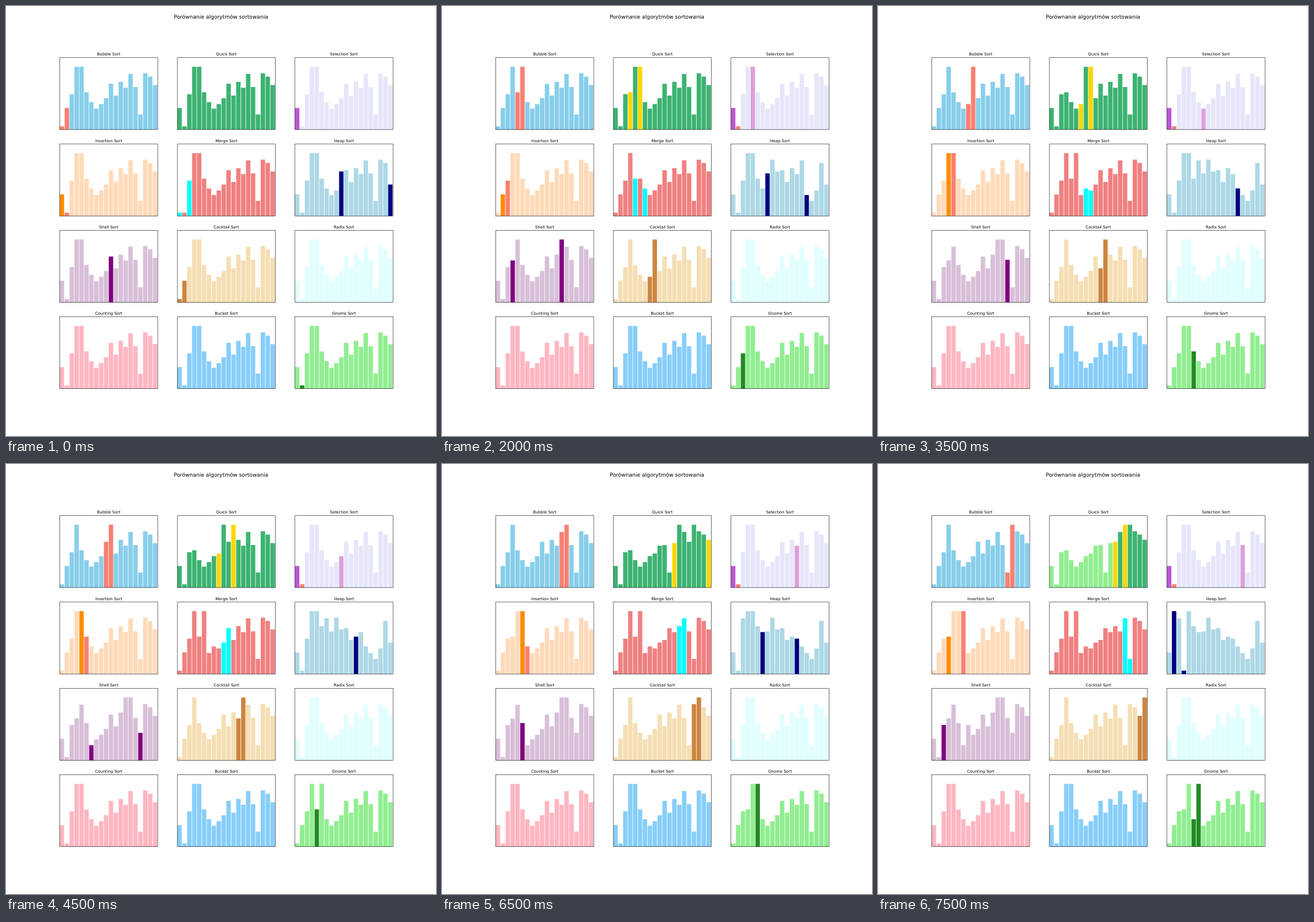
These frames come from a looping animation (748 by 748 pixels, 8 s). An HTML page:

```html
<!DOCTYPE html>
<html lang="pl">
<head>
<meta charset="utf-8">
<title>Porównanie algorytmów sortowania</title>
<style>
  html, body { margin: 0; width: 100%; height: 100%; overflow: hidden; background: #fff; }
  svg { display: block; width: 748px; height: 748px; }
  text {
    font-family: "DejaVu Sans", Verdana, sans-serif;
    font-size: 6.93px;
    text-anchor: middle;
    text-rendering: geometricPrecision;
  }
  text.head { font-size: 9.23px; }
  .axes { fill: none; stroke: #000; stroke-width: 0.6; }
</style>
</head>
<body>
<svg id="stage" viewBox="0 0 748 748">
  <text class="head" x="374" y="22.4">Porównanie algorytmów sortowania</text>
</svg>
<script>
const DATA = [33, 5, 54, 96, 96, 57, 42, 32, 39, 48, 70, 52, 73, 64, 85, 65, 23, 86, 81, 68];
const N = DATA.length;
const STEPS = 16, STEP_MS = 500;

// Grid geometry
const LEFT = 93.5, TOP = 89.76, W = 170.5, H = 125.2;
const PITCH_X = W * 1.2, PITCH_Y = H * 1.2;
const SLOT = W / N, BAR = SLOT * 0.9, UNIT = H / 110;

const swap = (a, i, j) => { [a[i], a[j]] = [a[j], a[i]]; };
const paint = (color, ...list) => list.map(i => [i, color]);

// Each sorter changes the array in place and yields [index, colour] marks;
// later marks cover earlier ones.
function* bubble(a) {
  for (let end = N - 1; end > 0; end--) {
    for (let j = 0; j < end; j++) {
      if (a[j] > a[j + 1]) swap(a, j, j + 1);
      yield paint('salmon', j, j + 1);
    }
  }
}

function* quick(a) {
  const stack = [[0, N - 1]];
  while (stack.length) {
    const [lo, hi] = stack.pop();
    if (lo >= hi) continue;
    const range = [];
    for (let i = 0; i < N; i++) {
      range.push([i, i >= lo && i <= hi ? 'mediumseagreen' : 'lightgreen']);
    }
    yield range;
    let i = lo - 1;
    for (let j = lo; j < hi; j++) {
      if (a[j] >= a[hi]) continue;
      swap(a, ++i, j);
      yield [...range, ...paint('gold', i, j)];
    }
    swap(a, ++i, hi);
    yield [...range, ...paint('gold', i, hi)];
    stack.push([lo, i - 1], [i + 1, hi]);
  }
}

function* selection(a) {
  for (let i = 0; i < N; i++) {
    let min = i;
    yield paint('mediumorchid', i);
    for (let j = i + 1; j < N; j++) {
      if (a[j] < a[min]) min = j;
      yield [[min, 'salmon'], [j, 'plum'], [i, 'mediumorchid']];
    }
    swap(a, i, min);
  }
}

function* insertion(a) {
  for (let i = 1; i < N; i++) {
    const key = a[i];
    let j = i - 1;
    const marks = () => [[j, 'darkorange'], [i, 'salmon']];
    yield marks();
    while (j >= 0 && a[j] > key) {
      a[j + 1] = a[j];
      j--;
      yield marks();
    }
    a[j + 1] = key;
    yield marks();
  }
}

function* merge(a) {
  for (let size = 1; size < N; size *= 2) {
    for (let lo = 0; lo < N; lo += 2 * size) {
      const mid = Math.min(lo + size, N), hi = Math.min(lo + 2 * size, N);
      const old = a.slice();
      let i = lo, j = mid;
      for (let k = lo; k < hi; k++) {
        const fromLeft = j >= hi || (i < mid && old[i] <= old[j]);
        a[k] = fromLeft ? old[i++] : old[j++];
        yield paint('cyan', i, j);
      }
    }
  }
}

function* sift(a, n, i) {
  let top = i;
  for (const child of [2 * i + 1, 2 * i + 2]) {
    if (child < n && a[child] > a[top]) top = child;
  }
  swap(a, i, top);
  yield paint('navy', i, top);
  if (top !== i) yield* sift(a, n, top);
}

function* heap(a) {
  for (let i = N / 2 - 1; i >= 0; i--) yield* sift(a, N, i);
  for (let end = N - 1; end > 0; end--) {
    swap(a, 0, end);
    yield* sift(a, end, 0);
  }
}

function* shell(a) {
  for (let gap = N >> 1; gap > 0; gap >>= 1) {
    for (let i = gap; i < N; i++) {
      const key = a[i];
      let j = i;
      while (j >= gap && a[j - gap] > key) {
        a[j] = a[j - gap];
        j -= gap;
        yield paint('purple', j, j - gap);
      }
      a[j] = key;
      yield paint('purple', j, i);
    }
  }
}

function* cocktail(a) {
  for (let lo = 0, hi = N - 1; lo < hi; lo++, hi--) {
    for (let j = lo; j < hi; j++) {
      if (a[j] <= a[j + 1]) continue;
      swap(a, j, j + 1);
      yield paint('peru', j, j + 1);
    }
    for (let j = hi - 1; j > lo; j--) {
      if (a[j - 1] <= a[j]) continue;
      swap(a, j - 1, j);
      yield paint('peru', j - 1, j);
    }
  }
}

function* gnome(a) {
  let i = 0;
  while (i < N) {
    if (i === 0 || a[i] >= a[i - 1]) {
      i++;
    } else {
      swap(a, i, i - 1);
      yield paint('forestgreen', i, i - 1);
      i--;
    }
    yield paint('forestgreen', i);
  }
}

// Still untouched during this stretch
function* idle() {
  while (true) yield [];
}

const PANELS = [
  ['Bubble', 'skyblue', bubble],
  ['Quick', 'mediumseagreen', quick],
  ['Selection', 'lavender', selection],
  ['Insertion', 'peachpuff', insertion],
  ['Merge', 'lightcoral', merge],
  ['Heap', 'lightblue', heap],
  ['Shell', 'thistle', shell],
  ['Cocktail', 'wheat', cocktail],
  ['Radix', 'lightcyan', idle],
  ['Counting', 'lightpink', idle],
  ['Bucket', 'lightskyblue', idle],
  ['Gnome', 'lightgreen', gnome]
];

function record(sorter, base) {
  const a = DATA.slice(), run = sorter(a), states = [];
  while (states.length < STEPS) {
    const marks = run.next().value;
    const colors = Array(N).fill(base);
    for (const [i, color] of marks) if (i >= 0 && i < N) colors[i] = color;
    states.push({ values: a.slice(), colors });
  }
  return states;
}

const stage = document.getElementById('stage');

function add(tag, attrs) {
  const el = document.createElementNS(stage.namespaceURI, tag);
  for (const key in attrs) el.setAttribute(key, attrs[key]);
  return stage.appendChild(el);
}

const panels = PANELS.map(([name, base, sorter], p) => {
  const x = LEFT + (p % 3) * PITCH_X;
  const y = TOP + Math.floor(p / 3) * PITCH_Y;
  const bars = DATA.map((_, i) => add('rect', { x: x + i * SLOT, width: BAR }));
  add('rect', { class: 'axes', x, y, width: W, height: H });
  add('text', { x: x + W / 2, y: y - 3.46 }).textContent = name + ' Sort';
  return { bars, floor: y + H, states: record(sorter, base) };
});

function draw(step) {
  for (const { bars, floor, states } of panels) {
    const { values, colors } = states[step];
    bars.forEach((bar, i) => {
      const h = values[i] * UNIT;
      bar.setAttribute('y', floor - h);
      bar.setAttribute('height', h);
      bar.setAttribute('fill', colors[i]);
    });
  }
}

const start = performance.now();
let shown = -1;

function tick() {
  const step = Math.floor((performance.now() - start) / STEP_MS) % STEPS;
  if (step !== shown) draw(shown = step);
  requestAnimationFrame(tick);
}
tick();
</script>
</body>
</html>
```
